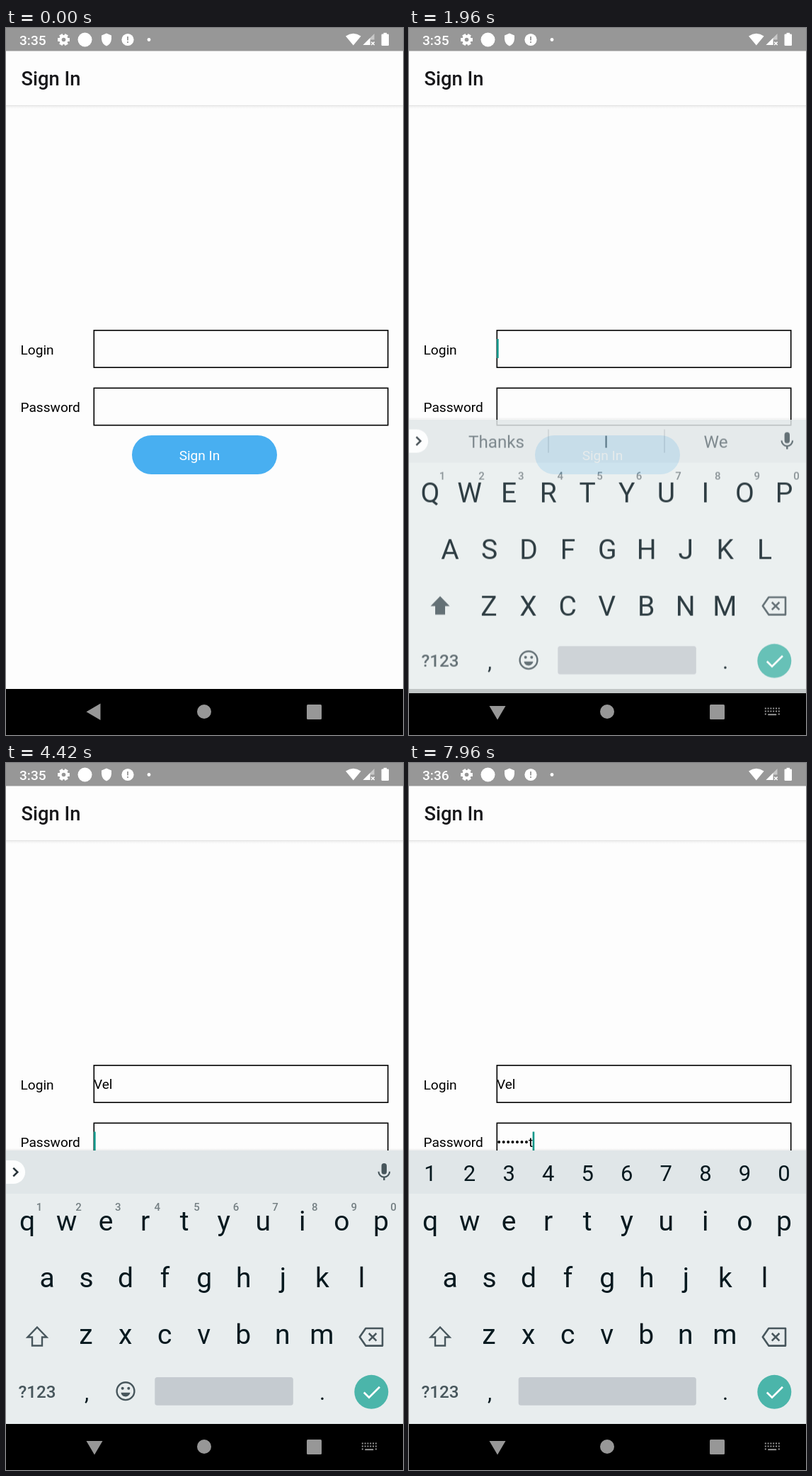
Write an HTML page with a canvas that moves like this. It is 561x998 px and loops after 8000 ms.

```html
<!DOCTYPE html>
<html lang="en">
<head>
<meta charset="utf-8">
<title>Sign In</title>
<style>
  html, body { margin: 0; width: 100%; height: 100%; overflow: hidden; background: #fdfdfd; }
  canvas { display: block; width: 561px; height: 998px; }
</style>
</head>
<body>
<canvas id="stage" width="561" height="998"></canvas>
<script>
const W = 561, H = 998, LOOP = 8000;
const KB_TOP = 547, KB_H = 386, NAV_TOP = 933;
const screen = document.getElementById('stage').getContext('2d');
const keyboard = document.createElement('canvas');
keyboard.width = W;
keyboard.height = KB_H;
const keys = keyboard.getContext('2d');

const LOGIN = 'Vel', SECRET = 'Testtest';
const T = {
  loginFocus: 1620, keyboardIn: 1900, keyboardDur: 200,
  login: [2980, 3360, 3720],
  secretFocus: 4360, secretLayout: 4560, shiftOn: 5000, shiftOff: 5590,
  secret: [5500, 5950, 6300, 6650, 6980, 7300, 7600, 7900],
  minute: 6750
};
const GREY = '#979797', INK = '#07191f', SLATE = '#47565c', TEAL = '#009688';

let c = screen;

function font(size, weight = 400) {
  c.font = `${weight} ${size}px Roboto, sans-serif`;
}
function text(str, x, y, size, color, weight, align = 'left') {
  font(size, weight);
  c.fillStyle = color;
  c.textAlign = align;
  c.fillText(str, x, y);
}
function rect(x, y, w, h, color, r = 0) {
  c.fillStyle = color;
  c.beginPath();
  c.roundRect(x, y, w, h, r);
  c.fill();
}
function disc(x, y, r, color) {
  c.fillStyle = color;
  c.beginPath();
  c.arc(x, y, r, 0, Math.PI * 2);
  c.fill();
}
function trace(points, closed) {
  c.beginPath();
  for (let i = 0; i < points.length; i += 2) c.lineTo(points[i], points[i + 1]);
  if (closed) c.closePath();
}
function poly(points, color) {
  trace(points, true);
  c.fillStyle = color;
  c.fill();
}
function line(points, color, width, closed = false) {
  trace(points, closed);
  c.strokeStyle = color;
  c.lineWidth = width;
  c.stroke();
}
function ring(x, y, r, color, width, from = 0, to = Math.PI * 2) {
  c.strokeStyle = color;
  c.lineWidth = width;
  c.beginPath();
  c.arc(x, y, r, from, to);
  c.stroke();
}
const countBefore = (times, t) => times.filter(at => at <= t).length;

// The caret restarts its half-second blink at every focus and keystroke.
function caretOn(t, events) {
  const last = Math.max(...events.filter(at => at <= t));
  return (t - last) % 1000 < 500;
}

function statusBar(t) {
  rect(0, 0, W, 32.5, GREY);
  text(t < T.minute ? '3:35' : '3:36', 19, 23.5, 19.1, '#fff', 500);
  for (let i = 0; i < 3; i++) {
    const a = i * Math.PI / 3, dx = 8.4 * Math.cos(a), dy = 8.4 * Math.sin(a);
    line([81.5 - dx, 16.5 - dy, 81.5 + dx, 16.5 + dy], '#fff', 5);
  }
  disc(81.5, 16.5, 6.4, '#fff');
  disc(81.5, 16.5, 2.8, GREY);
  disc(111.5, 16.5, 10, '#fff');
  c.fillStyle = '#fff';
  c.beginPath();
  c.moveTo(142, 7.5);
  c.lineTo(149, 10.5);
  c.lineTo(149, 15.5);
  c.quadraticCurveTo(148.5, 22.5, 142, 25.5);
  c.quadraticCurveTo(135.5, 22.5, 135, 15.5);
  c.lineTo(135, 10.5);
  c.fill();
  disc(172, 16.5, 8.6, '#fff');
  rect(171.1, 12, 1.8, 5.4, GREY);
  rect(171.1, 19, 1.8, 1.9, GREY);
  disc(202, 16.5, 2.4, '#fff');

  c.fillStyle = '#fff';
  c.beginPath();
  c.moveTo(490.8, 24.5);
  c.lineTo(480, 11.5);
  c.quadraticCurveTo(490.8, 4.2, 501.6, 11.5);
  c.fill();
  poly([504.5, 24, 520.5, 8, 520.5, 16.5, 514.5, 16.5, 514.5, 24], '#c9c9c9');
  poly([504.5, 24, 514.5, 14, 514.5, 24], '#fff');
  line([516.2, 19.6, 520.6, 24], '#fff', 1.5);
  line([520.6, 19.6, 516.2, 24], '#fff', 1.5);
  rect(530.5, 8.5, 10.5, 16.5, '#fff', 1.2);
  rect(533.5, 6.8, 4.5, 3, '#fff');
}

function header() {
  const g = c.createLinearGradient(0, 109, 0, 114);
  g.addColorStop(0, '#dedede');
  g.addColorStop(0.35, '#f2f2f2');
  g.addColorStop(1, '#fdfdfd');
  c.fillStyle = g;
  c.fillRect(0, 109, W, 5);
  text('Sign In', 21.5, 81.3, 27.3, '#17171a', 500);
}

function field(label, y, value, caret) {
  text(label, 20.5, y + 34.6, 19.1, '#000');
  c.strokeStyle = '#000';
  c.lineWidth = 1.6;
  c.strokeRect(124.3, y + 0.8, 415.4, 52.4);
  text(value, 124, y + 34.3, 19.1, '#000');
  if (caret) {
    const x = 124 + c.measureText(value).width;
    rect(value ? x - 0.7 : x, y + 13, 2.6, 27, TEAL);
  }
}

function form(t) {
  const n = countBefore(T.login, t);
  const m = countBefore(T.secret, t);
  const inLogin = t >= T.loginFocus && t < T.secretFocus;
  const inSecret = t >= T.secretFocus;
  field('Login', 426, LOGIN.slice(0, n), inLogin && caretOn(t, [T.loginFocus, ...T.login]));
  const masked = m ? '•'.repeat(m - 1) + SECRET[m - 1] : '';
  field('Password', 507.5, masked, inSecret && caretOn(t, [T.secretFocus, ...T.secret]));
  rect(178, 575, 205, 55, '#48aff1', 27.5);
  text('Sign In', 273.5, 610.3, 19.1, '#fff', 400, 'center');
}

function navBar(open) {
  rect(0, NAV_TOP, W, H - NAV_TOP, '#000');
  poly(open ? [113.5, 957, 136.5, 957, 125, 976.5] : [133.5, 953.5, 133.5, 977, 113.5, 965.2], GREY);
  disc(280, 965, 10, GREY);
  rect(425, 955, 21, 21, GREY, 1.5);
  if (!open) return;
  for (let row = 0; row < 3; row++)
    for (let i = 0; i < 6; i++)
      if (row < 2 || i === 0 || i === 5) rect(502.8 + i * 3.8, 959.5 + row * 4, 2, 2, GREY);
  rect(507.2, 968.2, 12, 2, GREY);
}

function suggestions(t) {
  const n = countBefore(T.login, t);
  disc(10.5, 577.5, 16.6, '#fdfefe');
  rect(0, 561, 11, 33, '#fdfefe');
  line([10.3, 571.7, 16.3, 577.5, 10.3, 583.3], '#263238', 2.5);

  rect(530.6, 565, 7.4, 15.6, SLATE, 3.7);
  ring(534.3, 576.8, 7.8, SLATE, 2.1, 0, Math.PI);
  line([534.3, 584.5, 534.3, 589], SLATE, 2.4);
  if (t >= T.secretFocus) return;
  rect(196.3, 561, 1.4, 33, '#c0c7ca');
  rect(360.3, 561, 1.4, 33, '#c0c7ca');
  const words = n ? ['', LOGIN.slice(0, n), ''] : ['Thanks', 'I', 'We'];
  words.forEach((word, i) => text(word, 123.5 + i * 155, 587, 24.2, '#657278', 400, 'center'));
}

function shiftKey(filled) {
  const arrow = [44, 796.5, 57.5, 810.5, 51, 810.5, 51, 822.5, 37, 822.5, 37, 810.5, 30.5, 810.5];
  if (filled) poly(arrow, SLATE);
  else line(arrow, SLATE, 2.4, true);
}

function deleteKey() {
  c.lineJoin = 'round';
  line([499.8, 810.3, 508.3, 798, 532, 798, 532, 822.6, 508.3, 822.6], SLATE, 2.6, true);
  c.lineJoin = 'miter';
  line([512.8, 805, 523.4, 815.6], SLATE, 2.5);
  line([523.4, 805, 512.8, 815.6], SLATE, 2.5);
}

function emojiKey() {
  ring(169, 886.7, 12.4, SLATE, 2.4);
  disc(164.7, 882.8, 2, SLATE);
  disc(173.3, 882.8, 2, SLATE);
  c.fillStyle = SLATE;
  c.beginPath();
  c.arc(169, 887.8, 6.6, 0.15, Math.PI - 0.15);
  c.fill();
}

function drawKeyboard(t) {
  const secret = t >= T.secretLayout;
  const upper = secret ? t >= T.shiftOn && t < T.shiftOff : t < T.login[0];
  c = keys;
  c.setTransform(1, 0, 0, 1, 0, -KB_TOP);
  rect(0, KB_TOP, W, KB_H, '#e8edee');
  rect(0, KB_TOP, W, 61, '#e0e6e8');

  if (!secret) suggestions(t);
  [...'1234567890'].forEach((d, i) => {
    if (secret) text(d, 30 + i * 55.55, 590, 31, INK, 400, 'center');
    else text(d, 47 + i * 55.6, 632.3, 15, '#747f83', 500, 'center');
  });

  const drop = upper ? 0 : -4;
  [['QWERTYUIOP', 30, 663.5], ['ASDFGHJKL', 58, 743.5], ['ZXCVBNM', 113, 823.7]].forEach(([row, x, y]) => {
    [...row].forEach((ch, i) => {
      text(upper ? ch : ch.toLowerCase(), x + i * 55.55, y + drop, 39, INK, 400, 'center');
    });
  });
  shiftKey(upper);
  deleteKey();

  text('?123', 44, 895.7, 24.2, SLATE, 500, 'center');
  text(',', 114, 898.5, 31, INK, 400, 'center');
  text('.', 447, 898.5, 31, INK, 400, 'center');
  if (!secret) emojiKey();
  const left = secret ? 154.7 : 210.3;
  rect(left, 867, 405.8 - left, 39.7, '#c5cbd0', 3.5);
  disc(516.3, 887.8, 24, '#4bb5aa');
  line([505.8, 888.5, 513, 895.7, 528, 880.7], '#fff', 2.7);
  c = screen;
}

function render(t) {
  rect(0, 0, W, H, '#fdfdfd');
  header();
  statusBar(t);
  form(t);
  navBar(t >= T.keyboardIn);
  if (t < T.keyboardIn) return;

  const p = Math.min(1, (t - T.keyboardIn) / T.keyboardDur);
  const rest = (1 - p) ** 5;
  drawKeyboard(t);
  c.globalAlpha = 1 - rest;
  const y = KB_TOP + 34 * rest;
  const g = c.createLinearGradient(0, y - 3, 0, y);
  g.addColorStop(0, 'rgba(0,0,0,0)');
  g.addColorStop(1, 'rgba(0,0,0,0.07)');
  c.fillStyle = g;
  c.fillRect(0, y - 3, W, 3);
  c.drawImage(keyboard, 0, y);
  c.globalAlpha = 1;
}

const start = performance.now();
function tick() {
  render((performance.now() - start) % LOOP);
  requestAnimationFrame(tick);
}
tick();
</script>
</body>
</html>
```
